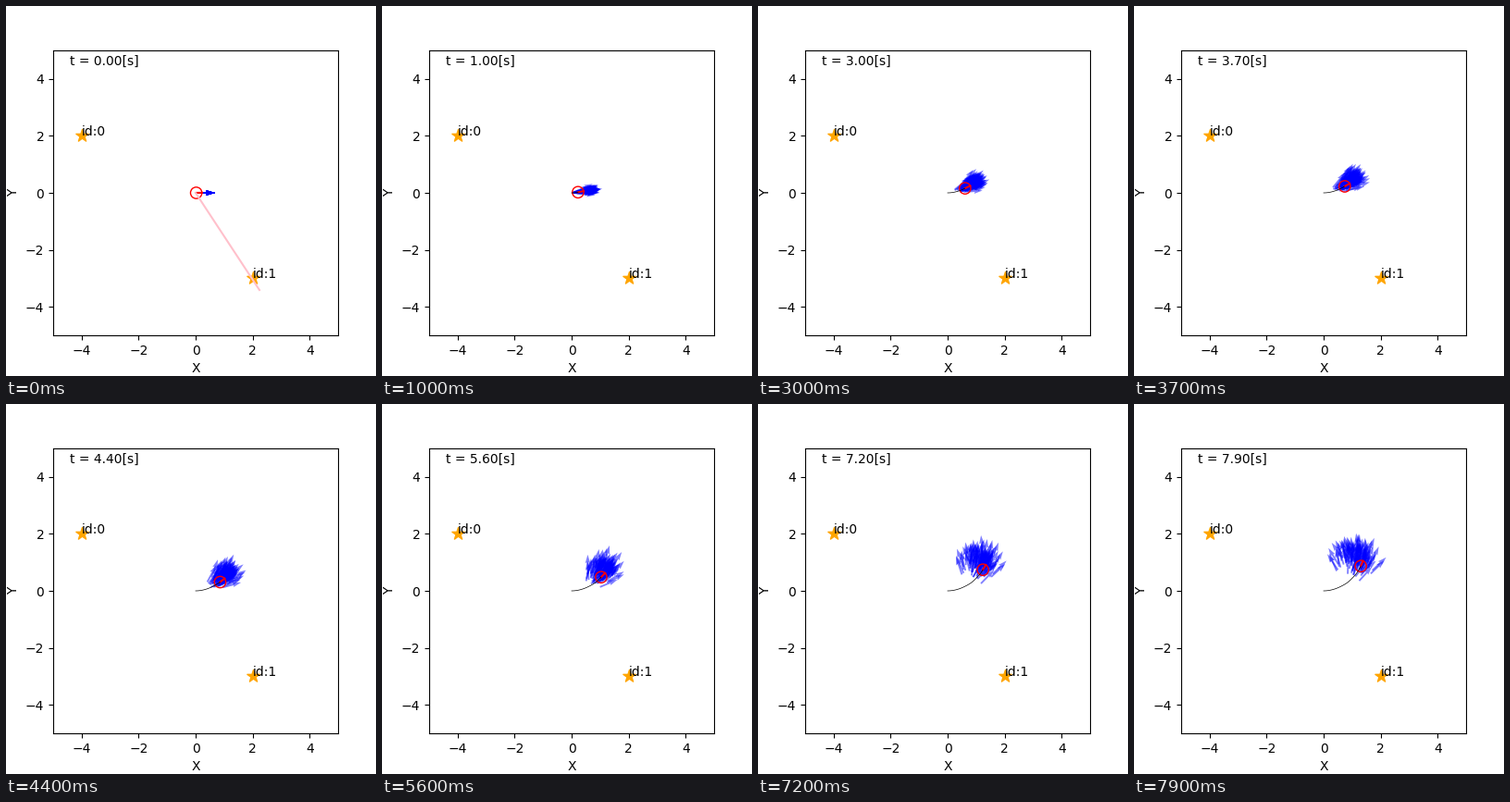
A matplotlib script for the animation above (8 s loop, 400 by 400 pixels).

```python
import numpy as np
import matplotlib.pyplot as plt
from matplotlib.animation import FuncAnimation
from matplotlib.patches import Circle

DT, FRAMES, COUNT = 0.1, 80, 100
NU, OMEGA = 0.2, np.radians(10)
RADIUS = 0.2
LANDMARKS = [(-4, 2), (2, -3)]
SIGHTINGS = [(2.24, -3.41), (2.2, -3.2), (2.02, -3.1)]


def robot_path():
    """Poses of the real robot, which drifts off the commanded arc."""
    t = np.arange(FRAMES + 1) * DT
    theta = np.radians(np.interp(t, [0, 1.05, 2.6, 3.8, 5.1, 6.1, 7.25, 8],
                                 [0, 10.8, 24, 30, 45, 48.5, 59, 66]))
    mid = (theta[1:] + theta[:-1]) / 2
    x = np.append(0, np.cumsum(0.206 * DT * np.cos(mid)))
    y = np.append(0, np.cumsum(0.206 * DT * np.sin(mid)))
    return x, y, theta


def particle_paths():
    """Particles diffusing around the commanded arc, one (x, y, theta) set per step."""
    rng = np.random.default_rng(4)
    speed_sd = 0.19 * np.sqrt(NU / DT)
    turn_sd = np.hypot(0.13 * np.sqrt(NU / DT), 0.2 * np.sqrt(OMEGA / DT))
    pose = np.zeros((3, COUNT))
    steps = [pose]
    for _ in range(FRAMES - 1):
        ds = (NU + rng.normal(0, speed_sd, COUNT)) * DT
        dth = (OMEGA + rng.normal(0, turn_sd, COUNT)) * DT
        mid = pose[2] + dth / 2
        pose = pose + np.array([ds * np.cos(mid), ds * np.sin(mid), dth])
        steps.append(pose)
    return steps


xs, ys, thetas = robot_path()
particles = particle_paths()

fig = plt.figure(figsize=(4, 4), dpi=100)
ax = fig.add_subplot(111)
ax.set_aspect("equal")
ax.set_xlim(-5, 5)
ax.set_ylim(-5, 5)
ax.set_xlabel("X", fontsize=10)
ax.set_ylabel("Y", fontsize=10)

for n, (lx, ly) in enumerate(LANDMARKS):
    ax.scatter(lx, ly, s=100, marker="*", color="orange")
    ax.text(lx, ly, f"id:{n}", fontsize=10)

zeros = np.zeros(COUNT)
arrows = ax.quiver(zeros, zeros, zeros + 1, zeros, angles="xy", scale_units="xy",
                   scale=1.5, color="blue", alpha=0.5)
body = ax.add_patch(Circle((0, 0), RADIUS, fill=False, color="red"))
nose, = ax.plot([], [], color="red")
trail, = ax.plot([], [], color="black", linewidth=0.5)
beam, = ax.plot([], [], color="pink")
clock = ax.text(-4.4, 4.5, "", fontsize=10)


def update(i):
    k = i + 1
    x, y, th = xs[k], ys[k], thetas[k]
    body.center = x, y
    nose.set_data([x, x + RADIUS * np.cos(th)], [y, y + RADIUS * np.sin(th)])
    trail.set_data(xs[:k + 1], ys[:k + 1])

    px, py, pth = particles[i]
    arrows.set_offsets(np.column_stack([px, py]))
    arrows.set_UVC(np.cos(pth), np.sin(pth))

    if i < len(SIGHTINGS):
        ex, ey = SIGHTINGS[i]
        beam.set_data([xs[i], ex], [ys[i], ey])
    else:
        beam.set_data([], [])
    clock.set_text(f"t = {i * DT:.2f}[s]")
    return arrows, body, nose, trail, beam, clock


anim = FuncAnimation(fig, update, frames=FRAMES, interval=100, repeat=True, repeat_delay=0)
plt.show()
```
